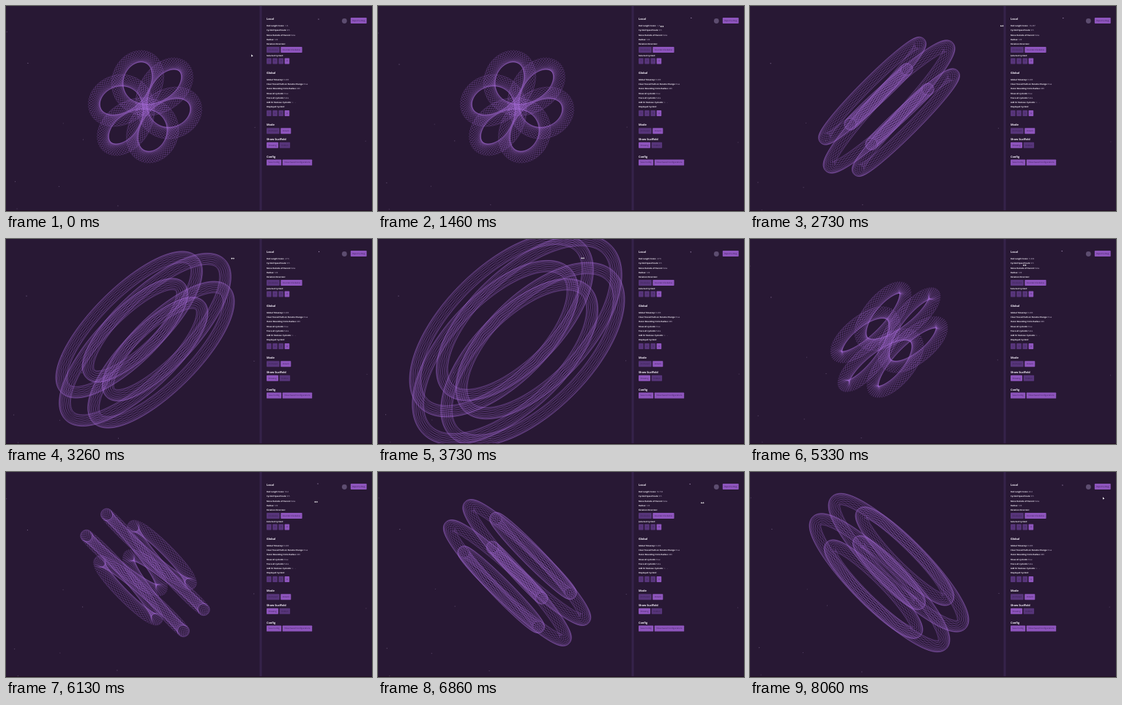
An HTML page with a canvas that plays this animation: 500x281 px, repeating every 8.12 s.

```html
<!DOCTYPE html>
<html lang="en">
<head>
<meta charset="utf-8">
<title>Cycloids</title>
<style>
html, body { margin: 0; width: 100%; height: 100%; overflow: hidden; background: #281834; }
canvas { display: block; width: 500px; height: 281px; }
</style>
</head>
<body>
<canvas id="stage"></canvas>
<script>
const W = 500, H = 281, LOOP = 8120, STEPS = 122, TAU = Math.PI * 2;
const LEFT = 356, LINE = 6.25;
const FONT = '"Open Sans", "Noto Sans", sans-serif';
const BG = '#281834';

const canvas = document.getElementById('stage');
const ctx = canvas.getContext('2d');
const dpr = window.devicePixelRatio || 1;
canvas.width = Math.round(W * dpr);
canvas.height = Math.round(H * dpr);

// The pointer walks to the number field, drags it left, then right, and leaves
const GRAB = 1060, DROP = 7260, GRAB_X = 388;
const path = [
  { t: 0, x: 336, y: 68 },
  { t: GRAB, x: GRAB_X, y: 28 },
  { t: 2050, x: GRAB_X, y: 28 },
  { t: 4000, x: 262, y: 26 },
  { t: 4530, x: 327, y: 31 },
  { t: 6130, x: 424, y: 41 },
  { t: DROP, x: 454, y: 43 },
  { t: 8060, x: 483, y: 36 }
];

function pointerAt(t) {
  const i = Math.max(1, path.findIndex(p => p.t >= t));
  const a = path[i - 1], b = path[i];
  const u = (t - a.t) / (b.t - a.t);
  return { x: a.x + (b.x - a.x) * u, y: a.y + (b.y - a.y) * u };
}

// Every three pixels of drag change the value by one
function rodScale(t) {
  const { x } = pointerAt(Math.min(Math.max(t, GRAB), DROP));
  return -1.6 + Math.round(x - GRAB_X) / 3;
}

function random(seed) {
  return () => (seed = seed * 16807 % 2147483647) / 2147483647;
}

function drawStars(t) {
  const rnd = random(77);
  const star = (x, y, alpha, phase) => {
    const a = t / LOOP * TAU + phase;
    ctx.fillStyle = `rgba(214,190,235,${alpha})`;
    ctx.beginPath();
    ctx.arc(x + Math.sin(a), y + Math.cos(2 * a), .6, 0, TAU);
    ctx.fill();
  };
  star(427, 17, .9, 0);
  star(29, 79, .5, 2);
  for (let i = 0; i < 10; i++) star(rnd() * W, rnd() * H, .2 + rnd() * .2, rnd() * TAU);
}

// Slow orbit + fast orbit + counter-rotating rod, wound with a small coil
function drawCycloid(scale) {
  const turns = 17, samples = 400;
  const coil = -(13 + 1 / turns);
  ctx.beginPath();
  for (let i = 0; i <= turns * samples; i++) {
    const a = i / samples * TAU;
    let x = 190, y = 138;
    const arm = (r, angle) => {
      x += r * Math.cos(angle);
      y += r * Math.sin(angle);
    };
    arm(34, .288 - a);
    arm(37, 5 * a);
    arm(8, coil * a);
    arm(2.75 * scale, Math.PI / 2 - 5 * a);
    ctx.lineTo(x, y);
  }
  ctx.strokeStyle = 'rgba(174,112,226,.56)';
  ctx.lineWidth = .42;
  ctx.lineJoin = 'round';
  ctx.stroke();
}

function text(str, x, y, size, color, weight = 400) {
  ctx.font = `${weight} ${size}px ${FONT}`;
  ctx.fillStyle = color;
  ctx.fillText(str, x, y);
  return ctx.measureText(str).width;
}

function heading(str, y) {
  text(str, LEFT, y, 3.85, '#f5effa', 700);
}

function rows(y, items) {
  for (const [label, value = ''] of items) {
    const w = text(label + ': ', LEFT, y, 2.72, '#f5effa', 700);
    text(value, LEFT + w, y, 2.72, '#dccfe8');
    y += LINE;
  }
}

function button(str, x, y, on) {
  ctx.font = `400 2.8px ${FONT}`;
  const w = ctx.measureText(str).width + 5;
  ctx.fillStyle = on ? '#8e55bd' : '#57357a';
  ctx.beginPath();
  ctx.roundRect(x, y - 4, w, 8, .7);
  ctx.fill();
  text(str, x + 2.5, y, 2.8, on ? '#3b1f58' : '#37204e');
  return w;
}

// Labels starting with * are switched on
function buttons(y, labels, x = LEFT) {
  for (const label of labels) {
    const on = label[0] === '*';
    x += button(on ? label.slice(1) : label, x, y, on) + 1.6;
  }
}

function drawPanel(scale) {
  const digits = ['1', '2', '3', '*4'];
  ctx.textBaseline = 'middle';
  ctx.textRendering = 'geometricPrecision';
  ctx.fillStyle = '#35224a';
  ctx.fillRect(346.5, 0, 3, H);

  heading('Local', 17.5);
  rows(27.5, [
    ['Rod Length Scale', String(+scale.toFixed(3))],
    ['Cycloid Speed Scale', '0.5'],
    ['Move Outside of Parent', 'false'],
    ['Radius', '129'],
    ['Rotation Direction']
  ]);
  buttons(60, ['Clockwise', '*Counter-Clockwise']);
  rows(68, [['Selected Cycloid']]);
  buttons(75.5, digits);

  heading('Global', 91.5);
  rows(101.2, [
    ['Global Timestep', '0.200'],
    ['Clear Traced Path on Params Change', 'true'],
    ['Outer Bounding Circle Radius', '499'],
    ['Show all cycloids', 'true'],
    ['Trace all cycloids', 'false'],
    ['Add Or Remove Cycloids', ' +   -'],
    ['Displayed Cycloid']
  ]);
  buttons(147, digits);

  heading('Mode', 163.3);
  buttons(171.2, ['Animated', '*Instant']);
  heading('Show Scaffold', 182.7);
  buttons(190.8, ['*Showing', 'Hidden']);
  heading('Config', 206.8);
  buttons(214.6, ['*Save Config', '*Show Saved Configurations']);

  buttons(20, ['*Report a Bug'], 470.8);
  ctx.fillStyle = '#5d4d70';
  ctx.beginPath();
  ctx.arc(462.3, 20.5, 3.4, 0, TAU);
  ctx.fill();
}

function drawPointer(t) {
  const { x, y } = pointerAt(t);
  ctx.fillStyle = '#fff';
  ctx.beginPath();
  if (t > GRAB && t < DROP) {
    for (const s of [-1, 1]) {
      ctx.moveTo(x + s * 2.4, y);
      ctx.lineTo(x + s * .9, y - 1.2);
      ctx.lineTo(x + s * .9, y + 1.2);
    }
    ctx.rect(x - 1.2, y - .3, 2.4, .6);
  } else {
    ctx.moveTo(x - .8, y - 1.8);
    ctx.lineTo(x - .8, y + 1.7);
    ctx.lineTo(x + .1, y + 1);
    ctx.lineTo(x + 1.6, y + .8);
  }
  ctx.fill();
}

function draw(now) {
  const step = LOOP / STEPS;
  // The small lead absorbs timer rounding at step edges
  const t = Math.min(Math.floor((now % LOOP + 5) / step), STEPS - 1) * step;
  const scale = rodScale(t);
  ctx.setTransform(dpr, 0, 0, dpr, 0, 0);
  ctx.fillStyle = BG;
  ctx.fillRect(0, 0, W, H);
  drawStars(t);
  drawCycloid(scale);
  drawPanel(scale);
  ctx.fillStyle = '#210d22';
  ctx.fillRect(0, 280, W, 1);
  drawPointer(Math.min(t, path[path.length - 1].t));
}

let origin;
function tick(now) {
  origin ??= now;
  draw(now - origin);
  requestAnimationFrame(tick);
}
draw(0);
requestAnimationFrame(tick);
</script>
</body>
</html>
```
